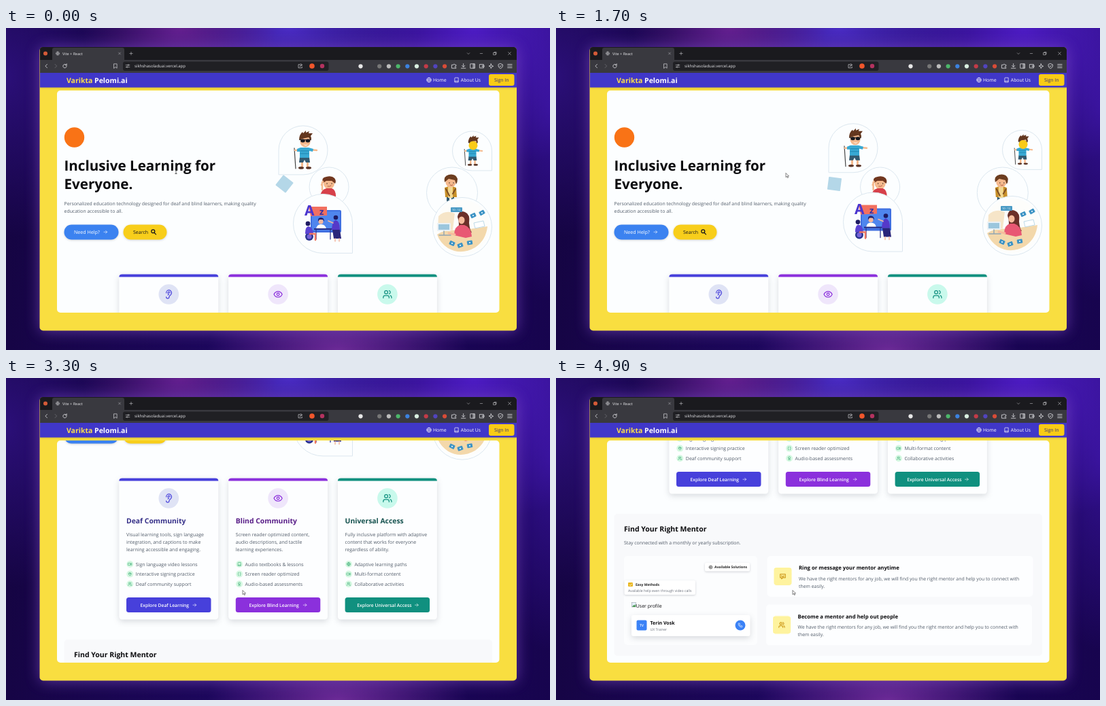
Recreate the animation shown at these times as an HTML page. Size 800 by 474 pixels, loop 5 s.

```html
<!DOCTYPE html>
<html lang="en">
<head>
<meta charset="utf-8">
<title>Inclusive learning page</title>
<style>
html, body { margin: 0; width: 100%; height: 100%; overflow: hidden; }
body {
  background:
    radial-gradient(ellipse 18% 22% at 32% 0%, #64208f, transparent),
    radial-gradient(ellipse 24% 24% at 52% 0%, #4a2cc4, transparent),
    radial-gradient(ellipse 30% 45% at 86% 0%, #4d1cc4, transparent),
    radial-gradient(ellipse 12% 60% at 100% 25%, #32108f, transparent),
    radial-gradient(ellipse 24% 20% at 61% 100%, #6b2a96, transparent),
    radial-gradient(ellipse 22% 50% at 0% 15%, #2b0f78, transparent),
    linear-gradient(100deg, #14043f, #1e0860 50%, #17044e);
}
svg { display: block; width: 100%; height: 100%; }
text { font-family: "Open Sans", "Noto Sans", sans-serif; text-rendering: geometricPrecision; white-space: pre; }
.soft { filter: drop-shadow(0 1px 1.5px #0f172a30); }
.lift { filter: drop-shadow(0 3px 4px #0f172a26); }
</style>
</head>
<body>
<svg id="stage" viewBox="0 0 800 474"></svg>
<script>
const icons = {
  ear: 'M6 8.5a6.5 6.5 0 1 1 13 0c0 6-6 6-6 10a3.5 3.5 0 1 1-7 0M15 8.5a2.5 2.5 0 0 0-5 0v1a2 2 0 1 1 0 4',
  eye: 'M2 12s3-7 10-7 10 7 10 7-3 7-10 7-10-7-10-7zM9 12a3 3 0 1 0 6 0a3 3 0 1 0-6 0',
  users: 'M16 21v-2a4 4 0 0 0-4-4H6a4 4 0 0 0-4 4v2M22 21v-2a4 4 0 0 0-3-3.9M16 3.1a4 4 0 0 1 0 7.8M5 7a4 4 0 1 0 8 0a4 4 0 1 0-8 0',
  arrow: 'M4 12h16M13 5l7 7-7 7',
  globe: 'M2 12a10 10 0 1 0 20 0a10 10 0 1 0-20 0h20M12 2a15 15 0 0 1 0 20a15 15 0 0 1 0-20',
  book: 'M4 19.5v-15A2.5 2.5 0 0 1 6.5 2H20v20H6.5a2.5 2.5 0 0 1 0-5H20',
  search: 'M3 9a7 7 0 1 0 14 0a7 7 0 1 0-14 0M14 14l8 8',
  video: 'M2 6h13v12H2zM15 10l7-4v12l-7-4',
  hand: 'M6 12V5M10 11V3M14 11V3M18 12V6v9a6 6 0 0 1-12 0l-3-5',
  award: 'M6 8a6 6 0 1 0 12 0a6 6 0 1 0-12 0M9 13l-2 9 5-3 5 3-2-9',
  braces: 'M8 3H6v7l-2 2 2 2v7h2M16 3h2v7l2 2-2 2v7h-2',
  phone: 'M5 3h4l2 5-3 2a12 12 0 0 0 6 6l2-3 5 2v4a2 2 0 0 1-2 2A17 17 0 0 1 3 5z',
  chat: 'M3 4h18v13H12l-4 4v-4H3zM8 9h1M15 9h1M8 12q4 3 8 0',
  chevron: 'M5 9l7 7 7-7',
  minus: 'M5 12h14',
  box: 'M5 8h11v11H5zM9 8V5h10v10h-3',
  cross: 'M5 5l14 14M19 5L5 19',
  plus: 'M12 4v16M4 12h16',
  back: 'M15 4l-8 8 8 8',
  next: 'M9 4l8 8-8 8',
  reload: 'M20 12a8 8 0 1 1-3-6l3 2M20 2v6h-6',
  mark: 'M6 3h12v18l-6-5-6 5z',
  tune: 'M2 7h10M18 7h4M12 7a3 3 0 1 0 6 0a3 3 0 1 0-6 0M12 17h10M2 17h4M6 17a3 3 0 1 0 6 0a3 3 0 1 0-6 0',
  share: 'M12 5H3v15h16v-5M9 14q1-7 9-7M14 2l6 5-6 5',
  puzzle: 'M3 7h6a3 3 0 1 1 6 0h5v6a3 3 0 1 0 0 5v3H3z',
  download: 'M12 2v13M6 10l6 6 6-6M3 21h18',
  panel: 'M3 3h18v18H3zM14 3v18M17 3v18',
  wallet: 'M3 5h16v15H3zM14 10h7v5h-7z',
  star: 'M11 3l3 7 7 3-7 2-3 7-2-7-7-3 7-2z',
  shield: 'M12 2l9 4v6q-1 7-9 10-8-3-9-10V6zM8 12l3 3 5-6',
  menu: 'M3 5h18M3 12h18M3 19h18',
  ring: 'M4 12a8 8 0 1 0 16 0a8 8 0 1 0-16 0M9 12h6M12 9v6'
};
const icon = (n, x, y, size, c, w = 2) =>
  `<path d="${icons[n]}" transform="translate(${x - size / 2} ${y - size / 2}) scale(${size / 24})" fill="none" stroke="${c}" stroke-width="${w}" stroke-linecap="round" stroke-linejoin="round"/>`;
const rect = (x, y, w, h, c, r = 0, more = '') =>
  `<rect x="${x}" y="${y}" width="${w}" height="${h}" rx="${r}" fill="${c}" ${more}/>`;
const disc = (x, y, r, c) => `<circle cx="${x}" cy="${y}" r="${r}" fill="${c}"/>`;
const oval = (x, y, rx, ry, c) => `<ellipse cx="${x}" cy="${y}" rx="${rx}" ry="${ry}" fill="${c}"/>`;
const path = (d, c, more = '') => `<path d="${d}" fill="${c}" ${more}/>`;
const line = (d, c, w = 1) => path(d, 'none', `stroke="${c}" stroke-width="${w}" stroke-linecap="round"`);
const text = (x, y, s, size, c, weight = 400, anchor = 'start') =>
  `<text x="${x}" y="${y}" font-size="${size}" font-weight="${weight}" fill="${c}" text-anchor="${anchor}">${s}</text>`;
const group = (id, body, more = '') => `<g id="${id}" ${more}>${body}</g>`;

// Round outline with an optional square corner: 'bl', 'br' or ''
function bubble(x, y, d, corner) {
  const r = d / 2, arc = (a, b) => `A${r} ${r} 0 0 1 ${a} ${b}`;
  const br = corner === 'br' ? `V${y + d}H${x + r}` : arc(x + r, y + d);
  const bl = corner === 'bl' ? `H${x}V${y + r}` : arc(x, y + r);
  return path(`M${x + r} ${y}${arc(x + d, y + r)}${br}${bl}${arc(x + r, y)}`, '#fcfeff', 'stroke="#dce7ef"');
}

const skin = '#f5b98d', hair = '#63371f', navy = '#29348f';

const caneBoy = (x, y, k) => `<g transform="translate(${x} ${y}) scale(${k})">` +
  line('M23 33L25 63', '#444', 1.2) + line('M31 36L24 36M45 35L56 36', skin, 2.5) +
  rect(33, 52, 3, 9, skin) + rect(41, 52, 3, 9, skin) +
  oval(33, 62, 4, 1.8, '#593426') + oval(44, 62, 4, 1.8, '#593426') +
  path('M31 46h14l1 8h-6l-2-4-2 4h-6z', '#335a70') +
  path('M32 32h12l7 2-1 4-5-1v10H31v-9l-4 0 0-4z', '#38a9d3') +
  line('M32 37h12M32 41h12', '#187ca8', .8) +
  oval(39, 23.5, 7.5, 8, skin) +
  path('M30 21q0-8 5-12l1 2 4-4 0 3 5-2-1 3 6 0-3 4q2 4 0 7l-3-5q-8 1-14 4z', hair) +
  oval(35.5, 22, 3.3, 2.5, '#17191f') + oval(43, 22, 3.3, 2.5, '#17191f') + line('M31 20.5h16', '#17191f') +
  path('M36 27q4 2 7 0q-3 4-7 0z', '#fff') + '</g>';

const redBoy = oval(475, 229, 8, 8, skin) +
  path('M466 228q-3-8 5-9 8-2 12 2 3 4 1 8l-5-4-8 0z', '#71371f') +
  path('M462 248q1-10 9-12h8q6 2 6 12z', '#d7404a') +
  line('M465 238l0-11M464 231l2-5', skin, 2.5) +
  disc(472, 229, .7, '#222') + disc(479, 229, .7, '#222') + line('M473 233q3 1 5-1', '#9c3b2f', .7);

const lesson = rect(448, 268, 45, 33, '#3f6fe0', 2) + rect(450, 270, 41, 28, '#4f86ee') +
  path('M445 263h27v13l-24 1z', '#f2705f') +
  text(439, 276, 'A', 21, '#4a35cf', 700) + text(461, 275, 'z', 13, '#2f2fa8', 700) +
  disc(463, 285, 3.5, '#f6b79c') + path('M459 285q-1-6 4-6 5 0 5 6l-2-3h-5z', '#22226e') +
  path('M456 296q1-7 7-7 7 0 8 7z', '#fff') + rect(453, 295, 27, 2, '#232a83') +
  line('M456 297v14M477 297v14', '#343b94', 1.3) +
  disc(446, 307, 6, navy) + disc(446, 307, 3.5, '#7663d9') +
  disc(444, 288, 3.4, '#1e1b63') + path('M440 303q0-11 5-11 6 1 7 11z', '#5b43d2') + line('M447 303h8v9', '#ef7862', 2.5) +
  disc(485, 279, 3.3, '#1e1b63') + path('M479 297q1-14 6-14 6 1 6 14z', '#5539c9') +
  path('M480 297h11l2 13h-11z', '#29257a') + line('M481 287l-7-3', '#f6b79c', 1.6) + line('M484 310v4M490 310v4', '#f6b79c', 1.5);

const packBoy = line('M650 248v6M657 248v6', '#335a70', 4) +
  path('M645 235q9-4 17 0l1 14h-17z', '#c89028') + path('M650 234h7v16h-7z', '#f2d891') +
  line('M647 237l5 10M661 237l-4 7', '#805023', 2) + oval(654, 227, 7.5, 7.5, skin) +
  path('M645 227q-2-9 6-11 10-2 13 6 0 5-2 8l-2-6-9-2z', '#6c3d20') +
  disc(652, 228, .7, '#222') + disc(658, 228, .7, '#222') + line('M653 231q2 2 4 0', '#8f3c28', .7);

const tile = (x, y, a) => rect(x - 4, y - 3, 8, 6, '#3e94c5', 1, `transform="rotate(${a} ${x} ${y})"`) + disc(x, y, 1, '#fff');
const desk = disc(671, 293, 40, '#fdfdfb') +
  path('M634 304q12-8 30-6 20-2 44-6-2 20-18 31-21 12-40 1-12-8-16-20z', '#f3d8ab') +
  path('M636 277q10-10 24-4l-3 24h-22z', '#f6e5c8') +
  path('M664 278q2-11 11-7 8 3 6 16 1 10 4 14h-21q4-12 0-23z', '#6b3029') +
  path('M659 305q0-13 9-15h6q10 3 11 17l-9 2z', '#e85873') + oval(670, 283, 4.5, 5.5, '#f6bc9c') +
  line('M660 304l-9-2', '#f6bc9c', 3) + rect(634, 287, 20, 12, '#e9f1f6', 1) + rect(636, 289, 16, 8, '#9bc6dd') +
  line('M644 299v5M637 305h17', '#91a5b2', 1.4) + rect(654, 264, 17, 7, '#4b9bc5', 1) +
  text(656, 269.5, '10 : 12', 4, '#fff') + tile(687, 276, -25) + tile(700, 272, -30) + tile(656, 317, 25) + tile(668, 320, -20) + tile(682, 316, -10) +
  path('M688 287l14-3 2 8-14 3z', '#fff', 'stroke="#acd0e1" stroke-width=".8"');

const art =
  group('cane', bubble(401, 144, 72, 'bl') + caneBoy(401, 144, 1)) +
  group('red', bubble(446, 205, 58, '') + redBoy) +
  group('lesson', bubble(422.5, 244.5, 87, 'br') + lesson) +
  group('small', bubble(656.5, 152, 58, 'br') + caneBoy(656, 152.5, .79) + disc(687, 173, 6.5, '#f9cb18')) +
  group('pack', bubble(618.5, 205, 75, '') + packBoy) +
  group('desk', bubble(627.5, 249.5, 87, '') + desk) +
  group('tilt', rect(-9.5, -9.5, 19, 19, '#b4d7e8', 1));

const gray = '#525c69', ink = '#0b0b0e';
const hero = disc(100.5, 161, 14.7, '#f97316') +
  text(85.5, 209.5, 'Inclusive Learning for', 20.6, ink, 700) + text(85.5, 237, 'Everyone.', 20.6, ink, 700) +
  text(85.5, 261.2, 'Personalized education technology designed for deaf and blind learners, making quality', 6.93, gray) +
  text(85.5, 272.2, 'education accessible to all.', 6.93, gray) +
  rect(85.5, 289.5, 80, 22, '#3b82f0', 11, 'class="soft"') + text(100, 302.9, 'Need Help?', 7.1, '#fff') + icon('arrow', 146.3, 300.3, 7, '#fff') +
  rect(172.5, 289.5, 64, 22, '#f8ce1b', 11, 'class="soft"') + text(187, 302.9, 'Search', 7, '#17171b') + icon('search', 217, 300.3, 8.5, '#17171b', 3.5);

const cards = [
  ['deaf', 'Deaf Community', '#352f88', '#4740db', '#dfe3f5', 'ear',
    ['Visual learning tools, sign language', 'integration, and captions to make', 'learning accessible and engaging.'],
    ['video', 'Sign language video lessons', 'hand', 'Interactive signing practice', 'users', 'Deaf community support'], 'Explore Deaf Learning'],
  ['blind', 'Blind Community', '#571c87', '#8b30dc', '#efe6fb', 'eye',
    ['Screen reader optimized content,', 'audio descriptions, and tactile', 'learning experiences.'],
    ['book', 'Audio textbooks &amp; lessons', 'braces', 'Screen reader optimized', 'award', 'Audio-based assessments'], 'Explore Blind Learning'],
  ['all', 'Universal Access', '#14514e', '#10907f', '#c9f9ec', 'users',
    ['Fully inclusive platform with adaptive', 'content that works for everyone', 'regardless of ability.'],
    ['globe', 'Adaptive learning paths', 'video', 'Multi-format content', 'users', 'Collaborative activities'], 'Explore Universal Access']
].map(([id, title, dark, main, pale, sign, body, list, label], i) => {
  const x = 166.3 + i * 160.8, mid = x + 73;
  let s = rect(x, 362.5, 146, 208, '#fdfeff', 4.5, `id="${id}" class="lift"`) +
    path(`M${x} 366.5q0-4 4.500-4h137q4.500 0 4.500 4z`, main) +
    disc(mid, 392, 14.8, pale) + icon(sign, mid, 392, 14.5, main) +
    text(x + 10.7, 429.3, title, 10.39, dark, 700);
  body.forEach((t, n) => s += text(x + 10.7, 447.7 + n * 11.1, t, 7, gray));
  for (let n = 0; n < 3; n++) {
    const y = 489 + n * 14.6;
    s += disc(x + 16, y, 5, '#d6f8e2') + icon(list[2 * n], x + 16, y, 6, '#1f9d61') + text(x + 24.5, y + 2.5, list[2 * n + 1], 7, gray);
  }
  return s + rect(x + 10.7, 538, 124.5, 22, main, 3.5, `id="${id}Button"`) +
    text(x + [67, 67, 68.5][i], 551.7, label, 6.76, '#fff', 600, 'middle') +
    group(id + 'Arrow', icon('arrow', x + [111, 112.5, 116][i], 549.2, 7, '#fff'));
}).join('');

const row = (id, y, sign, title) => group(id,
  rect(309, y, 391, 60, '#fdfeff', 5) + rect(319, y + 17, 26, 26, '#fff7b0', 4) +
  rect(319, y + 17, 26, 26, 'url(#dots)', 4) + icon(sign, 332, y + 30, 10, '#c9900b', 2.5) +
  text(355.5, y + 20.3, title, 7.76, ink, 700) +
  text(355.5, y + 35.8, 'We have the right mentors for any job, we will find you the right mentor and help you to connect with', 6.9, gray) +
  text(355.5, y + 46.8, 'them easily.', 6.9, gray));

const mentor = rect(85.5, 600, 629.5, 209, '#f8f9fb', 5) +
  text(100, 626, 'Find Your Right Mentor', 10.53, ink, 700) +
  text(100, 644.7, 'Stay connected with a monthly or yearly subscription.', 6.9, gray) +
  rect(100, 662, 196, 131, '#fcfdfe', 5) +
  rect(219, 672, 66, 12.5, '#fff', 2, 'class="soft"') + icon('ring', 227.5, 678.5, 7, '#333', 2.5) + text(233, 680.3, 'Available Solutions', 5.05, '#222', 700) +
  rect(100.5, 698, 104.5, 21, '#fff', 2, 'class="soft"') + rect(106, 701, 7, 6, '#eab720', 1) + line('M108 704.5l1.500 1 2-2.500', '#fff', .7) +
  text(117, 706, 'Easy Methods', 5.1, '#222', 700) + text(106, 715.3, 'Available help even through video calls', 5.2, '#6a707b') +
  rect(111.5, 730.5, 6, 6.5, '#e6f1fb', 0, 'stroke="#8a929c" stroke-width=".5"') + path('M112 737l2-3 1 1 2-2v4z', '#4c9a55') +
  text(117.8, 737.5, 'User profile', 6.95, ink) +
  rect(111, 749, 174.5, 31, '#fff', 3, 'class="lift"') + rect(118.5, 756.5, 15, 15, '#3b82f6', 2) +
  text(126, 766, 'TV', 5.2, '#fff', 600, 'middle') + text(138.5, 763.2, 'Terin Vosk', 7, ink, 700) + text(138.5, 771.5, 'UX Trainer', 5.1, '#6a707b') +
  disc(271, 764, 7.5, '#3b82f6') + icon('phone', 271, 764, 7.5, '#fff') +
  row('row1', 662, 'chat', 'Ring or message your mentor anytime') +
  row('row2', 733.5, 'users', 'Become a mentor and help out people');

const pale = '#d4d4d8';
const extras = ['#e8e8e8', '#777', '#bdbdbd', '#4cb66a', '#3b82e0', '#d9eee0', '#c33b48', '#5144bd', '#d84b37'];
const chrome = rect(50, 28, 701, 38, '#39393f') + rect(50, 28, 701, 19, '#1a1a1e') +
  path('M68 47V32q0-3 3-3H171q3 0 3 3v15z', '#39393f') +
  disc(58, 37.5, 3, '#d45a37') + icon('globe', 76, 37.5, 6, pale) + text(83, 39.5, 'Vite + React', 5.5, '#e6e6e9') +
  icon('cross', 167, 37.5, 5, pale) + icon('plus', 184, 37.5, 6.5, pale) +
  icon('chevron', 680, 37.5, 6, pale) + icon('minus', 699, 37.5, 6, pale) + icon('box', 719, 37.5, 7, pale) + icon('cross', 740.5, 37.5, 6.5, pale) +
  icon('back', 59.5, 56, 8, pale, 2.5) + icon('next', 73, 56, 8, '#77777e') + icon('reload', 86.5, 56, 8, pale, 2.5) + icon('mark', 161, 56, 8.5, pale) +
  rect(172, 49.5, 302.5, 13.5, '#202024', 3) + icon('tune', 179, 56, 7, pale) +
  text(189, 58.3, 'sikhshasoladuai.vercel.app', 6, '#e4e4e8') + icon('share', 433, 56, 8, pale) +
  disc(450, 56, 3.8, '#f0562b') + disc(465, 56, 3.2, '#b3325f') +
  extras.map((c, i) => disc(i ? 535.5 + i * 13.7 : 521.5, 56.3, 3.1, c)).join('') +
  ['puzzle', 'download', 'panel', 'wallet', 'star', 'shield', 'menu'].map((n, i) => icon(n, 659 + i * 13.65, 56, 8.5, pale, 2.4)).join('');

const nav = rect(50, 65.5, 701, 22, '#4037c9', 0, 'class="soft"') +
  `<text x="89" y="80.5" font-size="10.5" font-weight="700" fill="#fff"><tspan fill="#fbe04a">Varikta</tspan> Pelomi.ai</text>` +
  icon('globe', 622, 76.5, 8, '#fff') + text(628, 79.2, 'Home', 6.95, '#fff', 500) +
  icon('book', 662.5, 76.5, 8, '#fff') + text(668.8, 79.2, 'About Us', 6.85, '#fff', 500) +
  rect(710, 68, 37.5, 17, '#facc15', 3) + text(728.7, 79.2, 'Sign In', 6.95, '#312e81', 500, 'middle');

const stage = document.getElementById('stage');
stage.innerHTML = `<defs>
  <clipPath id="frame"><rect x="49.5" y="28" width="701.5" height="417.5" rx="5"/></clipPath>
  <clipPath id="view"><rect x="75" y="92" width="650.5" height="327" rx="5"/></clipPath>
  <pattern id="dots" width="2" height="2" patternUnits="userSpaceOnUse"><rect width="1" height="1" fill="#fbe76a"/></pattern>
  <filter id="blur" x="-10%" y="-10%" width="120%" height="120%"><feGaussianBlur stdDeviation="10"/></filter></defs>` +
  rect(48, 27, 705, 421, '#8250c9', 10, 'filter="url(#blur)" opacity=".55"') +
  group('window', rect(49, 28, 703, 418, '#f9de40') + rect(75, 92, 650.5, 327, '#fcfeff', 5) +
    `<g clip-path="url(#view)">${group('page', hero + art + cards + mentor)}</g>` + nav + chrome, 'clip-path="url(#frame)"') +
  group('pointer', path('M0 0v6.200l1.500-1.300 1.100 2.200 1-.5-1.100-2.100h2z', '#fff', 'stroke="#333" stroke-width=".6"')) +
  group('beam', line('M-1.200-3.500h2.400M0-3.500v7M-1.200 3.500h2.400', '#222', .7));

const $ = id => document.getElementById(id);
const set = (id, name, v) => $(id).setAttribute(name, v);
const move = (id, x, y) => set(id, 'transform', `translate(${x} ${y})`);
const ease = (t, a, b) => {
  const k = Math.min(1, Math.max(0, (t - a) / (b - a)));
  return k * k * (3 - 2 * k);
};
// Sum of eased steps, each [start, end, amount]
const steps = (t, list) => list.reduce((v, [a, b, d]) => v + d * ease(t, a, b), 0);

const scrolls = [[1950, 2150, 54], [2150, 2350, 53], [2350, 2550, 54], [2900, 3200, 54],
  [3450, 3700, 54], [3700, 3950, 53], [3945, 4200, 54], [4300, 4600, 24]];

function draw(t) {
  move('page', 0, -steps(t, scrolls));

  const bob = Math.sin(Math.PI * (t - 200) / 4200) ** 2;
  move('cane', 0, -4 * bob);
  move('red', 2 * bob, 0);
  move('lesson', 0, -3 * bob);
  move('small', 0, -2 * bob);
  move('pack', bob, 0);
  move('desk', 0, -2.5 * bob);
  set('tilt', 'transform', `translate(409.5 229.5) rotate(${38 - t * .018})`);

  const hover = ease(t, 3550, 3750) - ease(t, 4150, 4350);
  set('blindButton', 'fill', `rgb(${139 + 29 * hover} ${48 + 37 * hover} ${220 + 25 * hover})`);
  move('blindArrow', 2 * hover, 0);
  $('blind').style.filter = `drop-shadow(0 ${3 + 3 * hover}px ${4 + 3 * hover}px rgb(15 23 42 / ${.15 + .07 * hover}))`;

  move('row1', 2.5 - ease(t, 4000, 4900) + 14 * (1 - ease(t, 3600, 3950)), 0);
  set('row1', 'opacity', ease(t, 3550, 3950));
  move('row2', 20 * (1 - ease(t, 4050, 4650)), 0);
  set('row2', 'opacity', ease(t, 3950, 4550));

  const x = 250 + steps(t, [[150, 850, 41.5], [1050, 1650, 46.5], [1750, 2050, 10]]);
  const y = 211 + steps(t, [[150, 850, 24.5], [1050, 1650, -22], [1750, 2050, 99]]);
  const beam = t < 400;
  move('pointer', x, y);
  move('beam', x, y);
  set('pointer', 'opacity', beam ? 0 : 1);
  set('beam', 'opacity', beam ? 1 : 0);
}

const start = performance.now();
(function tick() {
  draw((performance.now() - start) % 5000);
  requestAnimationFrame(tick);
})();
</script>
</body>
</html>
```
